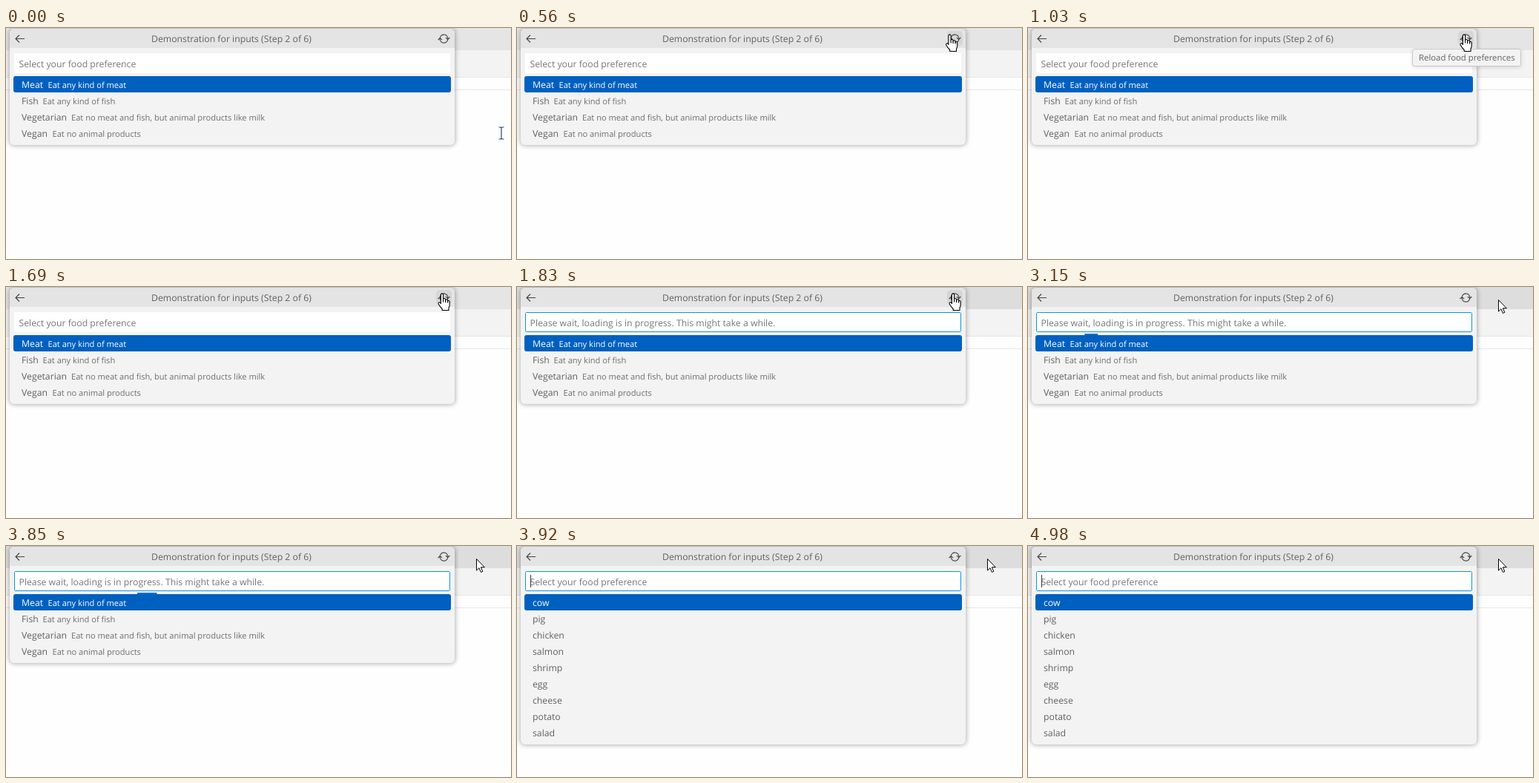
An HTML page that plays this animation: 681 by 312 pixels, repeating every 5240 ms.

```html
<!DOCTYPE html>
<html lang="en">
<head>
<meta charset="utf-8">
<title>Quick pick reload</title>
<style>
html, body { margin: 0; width: 100%; height: 100%; overflow: hidden; background: #fff; }
svg { display: block; }
text { font: 12.25px "Open Sans", "Noto Sans", sans-serif; fill: #616161; text-rendering: geometricPrecision; }
.description { font-size: 11.1px; fill: #6e6e6e; }
.selected text { fill: #fff; }
.icon { fill: none; stroke: #424242; stroke-width: 1.1; }
</style>
</head>
<body>
<svg width="681" height="312" viewBox="0 0 681 312">
  <defs>
    <filter id="shadow" x="-5%" y="-15%" width="110%" height="130%">
      <feGaussianBlur stdDeviation="3"/>
    </filter>
  </defs>

  <rect width="681" height="312" fill="#fefefe"/>
  <rect id="titleBar" width="681" height="30"/>
  <rect y="30" width="681" height="36" fill="#f3f3f3"/>
  <path d="M0 66.5H681M0 83.5H681" stroke="#e7e7e7"/>

  <rect id="widgetShadow" x="4" y="0" width="602" rx="7" fill="#000" opacity=".3" filter="url(#shadow)"/>
  <rect id="widget" x="5" y="1" width="600" rx="6" fill="#f3f3f3"/>
  <path d="M5 27V7Q5 1 11 1H599Q605 1 605 7V27Z" fill="#e4e4e4"/>
  <text x="196" y="18.5">Demonstration for inputs (Step 2 of 6)</text>
  <path class="icon" d="M25 14.5H13M18 9.5L13 14.5L18 19.5"/>
  <rect id="hover" x="580" y="4" width="21" height="20" rx="5" fill="#d6d6d6"/>
  <path class="icon" d="M585.3 13.2A5.3 5.3 0 0 1 595.8 15.2M593 13L595.8 15.6L598.4 13M595.7 15.8A5.3 5.3 0 0 1 585.2 13.8M582.6 16L585.2 13.4L588 16"/>

  <rect x="11" y="34" width="588" height="27" fill="#fff"/>
  <rect id="focus" x="11.5" y="34.5" width="587" height="26" rx="1" fill="none" stroke="#0f93e0"/>
  <text id="prompt" x="17.5" y="52.5" style="fill:#767676"></text>
  <rect id="caret" x="18" y="39" width="1" height="17" fill="#333"/>
  <rect id="progress" y="63" height="2" fill="#0e70c0"/>

  <rect x="10" y="65" width="590" height="22" rx="3" fill="#0060c0"/>
  <g id="dietList"></g>
  <g id="foodList"></g>

  <g id="tooltip">
    <rect x="519" y="30" width="146" height="23" rx="3" fill="#000" opacity=".13" filter="url(#shadow)"/>
    <rect x="518.5" y="28.5" width="146" height="23" rx="3" fill="#f3f3f3" stroke="#c8c8c8"/>
    <text x="527" y="44.3" style="font-size:11.35px">Reload food preferences</text>
  </g>

  <g id="pointer" stroke-linejoin="round">
    <path id="beam" d="M-3.5 -8H-1L0 -7L1 -8H3.5M0 -7V7M-3.5 8H-1L0 7L1 8H3.5" fill="none" stroke="#234a72" stroke-width="1.2"/>
    <path id="arrow" d="M.5 .5V16L4 12.6L6.4 18.4L8.8 17.4L6.4 11.7H11.3Z" fill="#fff" stroke="#000"/>
    <g id="hand" stroke="#000" stroke-width="1.1">
      <path d="M-1.6 14V2Q-1.6 .4 0 .4T1.6 2V8Q1.8 6.8 3.2 7T4.6 8.5V9.5Q5 8 6.4 8.3T7.6 10V10.7Q8 9.5 9.2 9.9T10.2 12V16Q10 18 9 19.5V23H.2V21Q-2.5 18.5 -4.8 14.5Q-5.4 12.8 -4 12.2T-1.6 14Z" fill="#fff"/>
      <path d="M1.6 8V12M4.6 9V12.5M7.6 10V13" fill="none"/>
    </g>
  </g>
</svg>
<script>
const LOOP = 5240;
const STEP = 70;
const LOADING = 1760;
const PROGRESS = 2655;
const RELOADED = 3920;

const diets = [
  ["Meat", 56.5, "Eat any kind of meat"],
  ["Fish", 49.5, "Eat any kind of fish"],
  ["Vegetarian", 88, "Eat no meat and fish, but animal products like milk"],
  ["Vegan", 62.5, "Eat no animal products"]
];
const foods = ["cow", "pig", "chicken", "salmon", "shrimp", "egg", "cheese", "potato", "salad"]
  .map(name => [name]);

// time, x, y of the pointer's hot spot
const pointerPath = [
  [0, 668, 142], [490, 580, 11], [560, 583.5, 8.5],
  [630, 583.5, 8.5], [840, 588, 8.5],
  [1960, 588, 8.5], [2520, 632, 17], [2590, 634, 17], [LOOP, 634, 17]
];

const el = id => document.getElementById(id);
const set = (id, attrs) => {
  for (const name in attrs) el(id).setAttribute(name, attrs[name]);
};
const show = (id, visible) => set(id, { visibility: visible ? "visible" : "hidden" });
const clamp = v => Math.min(1, Math.max(0, v));
const ease = v => v * v * (3 - 2 * v);

function fillList(id, rows) {
  el(id).innerHTML = rows.map(([label, x, description], i) => {
    const y = 80.7 + 22 * i;
    const detail = description ? `<text class="description" x="${x}" y="${y}">${description}</text>` : "";
    return `<g class="${i ? "" : "selected"}"><text x="21" y="${y}">${label}</text>${detail}</g>`;
  }).join("");
}

function pointerAt(t) {
  const i = pointerPath.findIndex(key => key[0] > t);
  const [t0, x0, y0] = pointerPath[i - 1];
  const [t1, x1, y1] = pointerPath[i];
  const k = ease((t - t0) / (t1 - t0));
  return [x0 + (x1 - x0) * k, y0 + (y1 - y0) * k];
}

function drawPointer(t) {
  const [x, y] = pointerAt(Math.floor(t / STEP) * STEP);
  const overButton = x < 601 && y < 25;
  set("pointer", { transform: `translate(${Math.round(x * 2) / 2} ${Math.round(y * 2) / 2})` });
  show("beam", y > 83);
  show("arrow", y <= 83 && !overButton);
  show("hand", overButton);
  show("hover", overButton);
}

function drawProgress(t) {
  const seconds = (Math.floor(t / STEP) * STEP - PROGRESS) / 1000;
  const width = 12 * (1 + Math.max(0, seconds));
  show("progress", seconds >= 0 && t < RELOADED);
  set("progress", { x: 11 + 150 * seconds - width / 2, width });
}

function draw(t) {
  const loading = t >= LOADING && t < RELOADED;
  const reloaded = t >= RELOADED;
  const height = reloaded ? 267 : 157;

  set("titleBar", { fill: t < LOADING ? "#e5e5e5" : "#dddddd" });
  set("widget", { height });
  set("widgetShadow", { height: height + 2 });
  el("prompt").textContent = loading
    ? "Please wait, loading is in progress. This might take a while."
    : "Select your food preference";
  show("focus", t >= LOADING);
  show("caret", reloaded && Math.floor((t - RELOADED) / 530) % 2 === 0);
  show("dietList", !reloaded);
  show("foodList", reloaded);
  set("tooltip", { opacity: t < 1690 ? clamp((t - 890) / 140) : 0 });
  drawProgress(t);
  drawPointer(t);
}

fillList("dietList", diets);
fillList("foodList", foods);

const start = performance.now();
function tick() {
  draw((performance.now() - start) % LOOP);
  requestAnimationFrame(tick);
}
tick();
</script>
</body>
</html>
```
